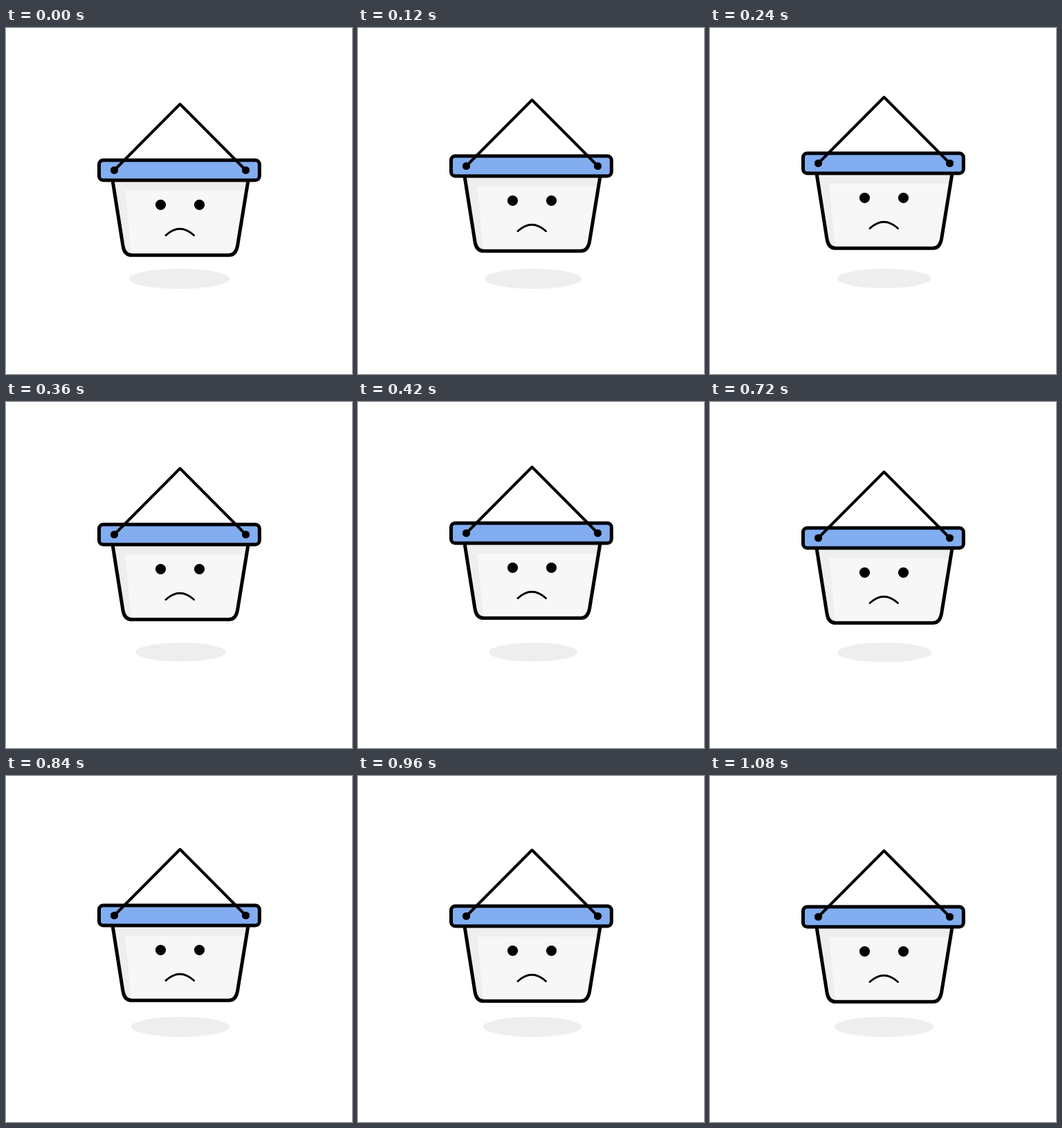
Animation of 500x500 px, one loop 1140 ms. Source, as an HTML page with a canvas:

```html
<!DOCTYPE html>
<html lang="en">
<head>
<meta charset="utf-8">
<title>Sad basket</title>
<style>
html, body { margin: 0; width: 100%; height: 100%; overflow: hidden; background: #fff; }
canvas { display: block; width: 500px; height: 500px; }
</style>
</head>
<body>
<canvas id="stage" width="500" height="500"></canvas>
<script>
const ctx = document.getElementById('stage').getContext('2d');
const STEP = 60, LOOP = 1140;

// time in steps, lift, shadow left, shadow right, shadow bottom
const KEYS = [
  [0, 0, 178, 323, 377],
  [2, 6, 183, 323, 377],
  [4, 10, 184, 319, 376],
  [7, 16, 189, 317, 375],
  [9, 16, 189, 317, 375],
  [10, 14, 187, 317, 375],
  [14, 4, 181, 323, 377],
  [18, 2, 180, 323, 377]
];

function pose(step) {
  let i = 0;
  while (i < KEYS.length - 2 && KEYS[i + 1][0] <= step) i++;
  const a = KEYS[i], b = KEYS[i + 1];
  const p = (step - a[0]) / (b[0] - a[0]);
  return a.slice(1).map((v, n) => Math.round(v + (b[n + 1] - v) * p));
}

function dot(x, y, r) {
  ctx.beginPath();
  ctx.arc(x, y, r, 0, Math.PI * 2);
  ctx.fillStyle = '#000';
  ctx.fill();
}

function shape(path, fill, width) {
  const p = new Path2D(path);
  if (fill) {
    ctx.fillStyle = fill;
    ctx.fill(p);
  }
  if (width) {
    ctx.lineWidth = width;
    ctx.stroke(p);
  }
}

function drawShadow(left, right, bottom) {
  const top = 348;
  ctx.beginPath();
  ctx.ellipse((left + right) / 2, (top + bottom) / 2,
    (right - left) / 2, (bottom - top) / 2, 0, 0, Math.PI * 2);
  ctx.fillStyle = '#eee';
  ctx.fill();
}

function drawBasket() {
  const body = 'M154 220L169 315Q171 328.3 182 328.3H322Q332 328.3 334.5 315L350 220';
  shape(body, '#eee');
  shape('M172.5 235H347L334.5 315Q332 328.3 322 328.3H181Z', '#f7f7f7');
  shape(body, null, 5);

  ctx.beginPath();
  ctx.roundRect(134.5, 191, 231.8, 29, 6);
  ctx.fillStyle = '#82adf0';
  ctx.fill();
  ctx.lineWidth = 5;
  ctx.stroke();

  shape('M156.5 205.5L251.5 110L346.5 205.5', null, 4);
  dot(156.5, 205.5, 5.6);
  dot(346.5, 205.5, 5.6);

  dot(223.5, 255.5, 7.6);
  dot(279.5, 255.5, 7.6);
  shape('M231 299.5Q251.2 281 271.5 299.5', null, 3);
}

function frame(now) {
  const [lift, left, right, bottom] = pose(Math.floor((now % LOOP) / STEP));
  ctx.fillStyle = '#fff';
  ctx.fillRect(0, 0, 500, 500);
  ctx.strokeStyle = '#000';
  ctx.lineCap = ctx.lineJoin = 'round';
  drawShadow(left, right, bottom);
  ctx.save();
  ctx.translate(0, -lift);
  drawBasket();
  ctx.restore();
}

let start;
function tick(now) {
  if (start === undefined) start = now;
  frame(now - start);
  requestAnimationFrame(tick);
}
frame(0);
requestAnimationFrame(tick);
</script>
</body>
</html>
```
